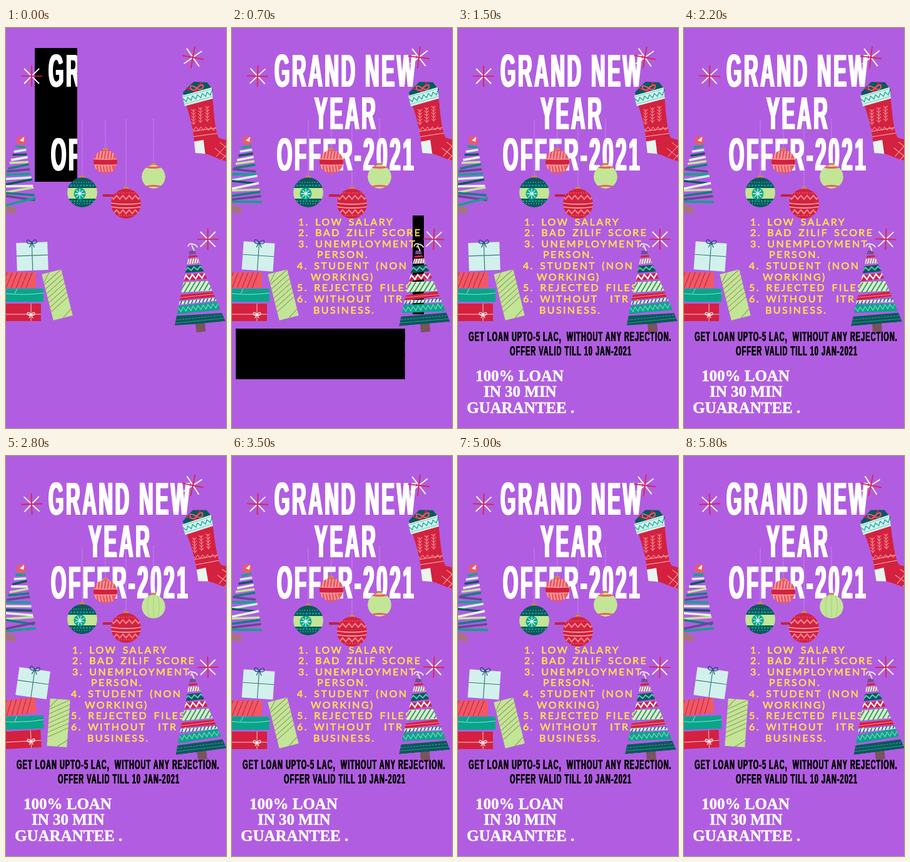
These frames come from a looping animation (352x640 px, 5900 ms). An HTML page:

```html
<!DOCTYPE html>
<html lang="en">
<head>
<meta charset="utf-8">
<title>New year offer</title>
<style>
html, body { margin: 0; width: 100%; height: 100%; overflow: hidden; background: #b15de1; }
.layer, svg { position: absolute; left: 0; top: 0; width: 352px; height: 640px; overflow: hidden; }
.layer b { position: absolute; background: #000; }
/* zero line height plus a negative margin puts the baseline at "top" */
.layer span { position: absolute; white-space: pre; line-height: 0; transform-origin: 0 0; }
.title span { font: bold 74.5px "Liberation Sans", sans-serif; line-height: 0; margin-top: -.3465em; color: #fff;
  letter-spacing: 8.6px; transform: scaleX(.42); text-shadow: 3px 0, -3px 0; }
.list span { font: 16px Lato, sans-serif; line-height: 0; margin-top: -.387em; color: #ffe34a;
  letter-spacing: 2.4px; word-spacing: 3px; -webkit-text-stroke: .6px #ffe34a; }
.offer span { font: bold 22px "Liberation Sans", sans-serif; line-height: 0; margin-top: -.3465em; color: #000;
  letter-spacing: 2px; transform: scaleX(.5); text-shadow: .5px 0, -.5px 0; }
.promise span { font: bold 25px "Liberation Serif", serif; line-height: 0; margin-top: -.3375em; color: #fff;
  -webkit-text-stroke: .5px #fff; }
</style>
</head>
<body>
<div id="texts"></div>
<svg id="art" viewBox="0 0 352 640"></svg>
<script>
const LOOP = 5900, STEP = 100, WIPE = 620;
const RED = '#d3213f', PINK = '#ef5965', TEAL = '#08a58b', DARK = '#07595d',
      MINT = '#d2f1ed', LIME = '#c3e596', GOLD = '#c98a4a';

// Text blocks: class, wipe start, black box [x0, y0, x1, y1], lines [x, baseline, text]
const blocks = [
  ['title', -155, [46, 32, 318, 246], [
    [68, 95, 'GRAND NEW'], [132, 163, 'YEAR'], [72, 229, 'OFFER-2021']]],
  ['list', 25, [92, 300, 307, 458], [
    [106, 316, '1. LOW SALARY'], [106, 333, '2. BAD ZILIF SCORE'],
    [106, 351, '3. UNEMPLOYMENT.'], [136, 368, 'PERSON.'],
    [104, 386, '4. STUDENT (NON'], [126, 404, 'WORKING)'],
    [104, 421, '5. REJECTED FILES'], [104, 439, '6. WITHOUT  ITR /'],
    [130, 457, 'BUSINESS.']]],
  ['offer', 205, [6, 481, 345, 562], [
    [17, 502, 'GET LOAN UPTO-5 LAC,  WITHOUT ANY REJECTION.'],
    [83, 525, 'OFFER VALID TILL 10 JAN-2021']]],
  ['promise', 700, [6, 538, 194, 630], [
    [28, 565, '100% LOAN'], [41, 590, 'IN 30 MIN'], [14, 616, 'GUARANTEE .']]]
].map(([name, start, box, lines]) => {
  const layer = document.createElement('div');
  layer.className = 'layer ' + name;
  layer.innerHTML = '<b></b>' + lines.map(([x, y, s]) =>
    `<span style="left:${x}px;top:${y}px">${s}</span>`).join('');
  texts.append(layer);
  return { layer, shade: layer.firstChild, box, start };
});

const clamp = v => Math.max(0, Math.min(1, v));

function wipe({ layer, shade, box: [x0, y0, x1, y1], start }, t) {
  const at = k => x0 + (x1 - x0) * clamp(k);
  const head = at((t - start) / WIPE), tail = at((t - start - WIPE) / 60);
  layer.style.clipPath = head < x1 ? `inset(0 ${352 - head}px 0 0)` : 'none';
  layer.style.visibility = head > x0 ? 'visible' : 'hidden';
  shade.style.cssText = `left:${tail}px;top:${y0}px;width:${head - tail}px;height:${y1 - y0}px`;
}

// SVG helpers
const rect = (x, y, w, h, fill) => `<rect x="${x}" y="${y}" width="${w}" height="${h}" fill="${fill}"/>`;
const shape = (d, fill) => `<path d="${d}" fill="${fill}"/>`;
const stroke = (d, color, w = 1, more = '') =>
  `<path d="${d}" fill="none" stroke="${color}" stroke-width="${w}" ${more}/>`;
const group = (x, y, deg, inner) => `<g transform="translate(${x} ${y}) rotate(${deg})">${inner}</g>`;
const clip = (id, outline, inner) => `<clipPath id="${id}">${outline}</clipPath><g clip-path="url(#${id})">${inner}</g>`;
const range = (n, f) => Array.from({ length: n }, (_, i) => f(i)).join('');
const zig = (x0, x1, y, step, h) =>
  range(Math.ceil((x1 - x0) / step) + 1, i => `${i ? 'L' : 'M'}${x0 + i * step} ${y + (i % 2 ? h : -h)}`);
const hatch = (x0, x1, y0, y1, step, lean) => // slanted lines across a box
  range(Math.floor((y1 - y0) / step), i => `M${x0} ${y0 + i * step + lean}L${x1} ${y0 + i * step}`);
const bars = (x0, x1, y0, y1, step, lean) =>
  range(Math.floor((x1 - x0) / step), i => `M${x0 + i * step} ${y1}L${x0 + i * step + lean} ${y0}`);
const random = n => { const v = Math.sin(n * 127.1 + 3) * 43758.5; return v - Math.floor(v); };

const star = (x, y, deg, r) => group(x, y, deg,
  stroke(`M${-r} 0H${r}M0 ${-r}V${r}`, '#e0213f', 1.7) +
  stroke(range(4, i => {
    const a = (i + .5) * Math.PI / 2, c = Math.cos(a) * r, s = Math.sin(a) * r;
    return `M${c * .12} ${s * .12}L${c} ${s}`;
  }), '#fff', 1.9));

function ball(id, x, y, r, top, fill, inner) {
  return stroke(`M${x} ${top}V${y - r - 3}`, '#e3bdf5', .9, 'stroke-dasharray="2 1.5" opacity=".75"') +
    group(x, y, 0, rect(-4, -r - 3, 8, 5, GOLD) +
      clip(id, `<circle r="${r}"/>`, `<circle r="${r}" fill="${fill}"/>` + inner));
}

function balls(p) {
  const low = p == 2;
  const spokes = range(8, i => {
    const a = i * Math.PI / 4;
    return `M0 0L${8 * Math.cos(a)} ${8 * Math.sin(a)}`;
  });
  return ball('c', 159, low ? 217 : 214, 19, 147, PINK,
      stroke(bars(-14, 18, -17, -4, 5, 2) + bars(-14, 18, 5, 16, 5, -2), '#f9c9c0', 1.3) +
      rect(-20, -3, 40, 7, RED) + stroke('M-20 -5Q0 -2 20 -5M-20 5Q0 8 20 5', '#f5a9a4', 1)) +
    ball('d', 236, low ? 241 : 238, 19, 145, LIME, low
      ? stroke('M-6 -19Q-13 0 -6 19M6 -19Q13 0 6 19M0 -19V19', '#a5cf82', 1)
      : stroke('M-12 -16Q0 -13 12 -16M-12 16Q0 13 12 16', PINK, 3)) +
    ball('a', 122, low ? 261 : 263, 24, 148, DARK,
      rect(-25, -7, 50, 17, LIME) + stroke('M-24 -11H24M-24 14H24', TEAL, 2.5, 'stroke-dasharray="3 2"') +
      stroke('M-18 -16H18M-17 18H17', MINT, 1, 'stroke-dasharray="1 3"') +
      group(-4, 2, low ? 20 : 0, `<circle r="9.5" fill="${TEAL}"/>` + stroke(spokes, MINT, 1.3))) +
    rect(155, 266, 17, 4, '#c3213f') +
    ball('b', 192, low ? 275 : 281, 24, 146, RED,
      stroke(zig(-25, 25, -10, 5, 3), '#f3878b', 2) + stroke(zig(-25, 25, 13, 5, 3), '#f3878b', 2) +
      stroke('M-25 -1Q0 3 25 -1M-25 5Q0 9 25 5', '#f8c5b8', 1.3) +
      stroke('M-20 -17H20M-16 19H16', PINK, 1.5, 'stroke-dasharray="2 2"'));
}

function gifts(p) {
  const bow = (color, s) => stroke(
    `M0 0Q${-s} ${-s} ${-s} 0Q${-s / 2} ${s / 2} 0 0Q${s} ${-s} ${s} 0Q${s / 2} ${s / 2} 0 0L${-s / 2} ${s}M0 0L${s / 2} ${s}`, color, 1.2);
  const tilt = [0, 0, -6][p];
  return group(p == 2 ? 84 : 82, 427, [-14, -14, 4][p],
      rect(-16, -38, 32, 76, LIME) + stroke(hatch(-16, 16, -38, 20, 7.5, 17), '#8f9a63', 1.1) +
      stroke('M-16 -24L-4 -38M0 38L16 27', '#8f9a63', 1.1)) +
    group(0, 403, tilt, rect(-10, -12, 58, 25, PINK) + stroke(bars(-8, 42, -12, 13, 8, 10), '#c8273f', 1.2)) +
    group(0, 428, tilt / 3, rect(-10, -11, 70, 21, TEAL) + stroke('M0 -3Q30 0 60 -4M14 -3L18 -11', '#9bdccb', 1)) +
    group(0, 455, tilt / 2, rect(-10, -14, 66, 28, RED) + stroke('M0 3H56M40 -14V14', '#f7c8c4', 1) +
      group(40, 3, 0, bow('#fff', 6))) +
    group(p == 2 ? 43 : 42, p == 2 ? 364 : 366, [-2, 4, 8][p],
      rect(-25, -23, 50, 45, MINT) + stroke('M0 -23V22M-25 -2H25', '#377b7a', 1.2) +
      group(0, -23, 0, bow('#164e78', 8)));
}

function leftTree(p) {
  const tints = [TEAL, MINT, DARK, '#e8f3f0', LIME, '#0a7f83', '#6a4590'];
  return shape('M-2 281L16 289L14 298L-2 294Z', '#a5757b') +
    range(15, i => {
      const y = 190 + i * 6.3, lean = (random(i + p * 20) - .4) * (8 + i);
      const left = Math.max(-4, 15 - i * 2.3), right = 31 + i * 1.2;
      return stroke(`M${left} ${y + lean / 2}L${right} ${y - lean / 2}`, tints[i % 7], 3.6);
    }) +
    shape('M17 175L30 173L32 183L27 188L18 185Z', PINK) +
    shape('M22 180L29 174L28 182Z', '#fff');
}

function rightTree(p) {
  const bands = [[9, 15, '#705090'], [17, 20, RED], [22, 30, MINT], [33, 44, DARK], [47, 56, RED], [59, 75, '#dcefc0'],
    [78, 86, RED], [88, 93, MINT], [95, 108, TEAL], [112, 127, DARK]];
  return group(297, 347, [-6, -5, -7][p],
    rect(-7, 125, 15, 15, '#79535e') +
    clip('t', '<path d="M0 -3L-41 127H41Z"/>',
      bands.map(([a, b, c], i) =>
        group(0, (a + b) / 2, (random(i + p * 9) - .5) * 6, rect(-46, (a - b) / 2, 92, b - a, c))).join('') +
      stroke(bars(-12, 14, 22, 30, 4, 3), RED, 1) +
      stroke(zig(-20, 20, 38, 5, 2.5), '#5fc4b4', 2) +
      stroke(zig(-24, 24, 51, 5, 3.5), '#fff', 2.2) +
      stroke(bars(-36, 32, 59, 75, 8, 12), '#2d9a7e', 2) +
      stroke('M-40 82H40', '#f48b90', 1) +
      stroke(bars(-34, 36, 88, 93, 6, 3), DARK, 1.5) +
      stroke(zig(-40, 40, 101, 4, 3.5), '#7ed3bd', 1.2) +
      stroke('M-42 117H42', '#3e9289', 1.3, 'stroke-dasharray="3 2"') +
      stroke('M-42 122H42', '#3e9289', 1)) +
    stroke('M-6 2Q-4 -4 2 -1Q7 0 9 5M0 0L3 10', '#eee', 1.8));
}

function stocking(p) {
  const leaf = (x, y, n) => stroke(`M${x} ${y}V${y + n * 5}` +
    range(n, i => `M${x - 3.5} ${y + i * 5}L${x} ${y + i * 5 + 4}L${x + 3.5} ${y + i * 5}`), '#f2868b', 1.1);
  const leg = 'M288 123L331 113C333 140 335 166 341 176L356 180V214C338 211 327 202 316 201L303 200C301 178 299 155 288 123Z';
  return `<g transform="rotate(${[0, -1, -3][p]} 310 110)">` +
    shape('M283 103L300 86L322 87L331 99L328 110L288 116Z', DARK) +
    stroke('M289 96L316 105M312 87L300 109', RED, 2.5) +
    stroke('M305 96Q292 88 296 98Q302 102 305 96Q318 86 315 96Q311 101 305 96', PINK, 2) +
    clip('s', `<path d="${leg}"/>`, shape(leg, RED) +
      leaf(300, 130, 5) + leaf(311, 127, 5) + leaf(322, 125, 5) +
      stroke(zig(296, 340, 161, 4, 2.5), '#f2868b', 1.1) +
      stroke('M294 166L342 159M298 174L342 168', '#f7b4b0', 1) +
      shape('M299 182L316 179L319 203L300 203Z', '#e9f5ef') +
      stroke('M336 206L356 184M344 212L358 196M334 192L356 210M342 183L356 194', '#f7b4b0', 1)) +
    shape('M282 108L329 95L331 113L286 125Z', MINT) +
    `<g transform="rotate(-15 306 110)">` + stroke(zig(283, 329, 110, 4, 3), TEAL, 1.2) +
    stroke('M283 104H330M283 116H330', '#7fc9c4', .9) + '</g></g>';
}

const scene = p =>
  leftTree(p) + gifts(p) + rightTree(p) + stocking(p) + balls(p) +
  star(41, 77, [0, 2, -2][p], 17) + star(299, 47, [10, 7, 12][p], 17.5) + star(323, 338, [0, 2, -1][p], 17);

// The ornaments hold three poses in a short cycle
function poseAt(t) {
  const phase = t % 1500;
  return phase < 250 ? 0 : phase < 1250 ? 1 : 2;
}

let shown = -1;
function draw(now) {
  const t = Math.floor(now % LOOP / STEP) * STEP, pose = poseAt(t);
  blocks.forEach(b => wipe(b, t));
  if (pose != shown) art.innerHTML = scene(shown = pose);
}

const begin = performance.now();
function tick() {
  draw(performance.now() - begin);
  requestAnimationFrame(tick);
}
tick();
</script>
</body>
</html>
```
